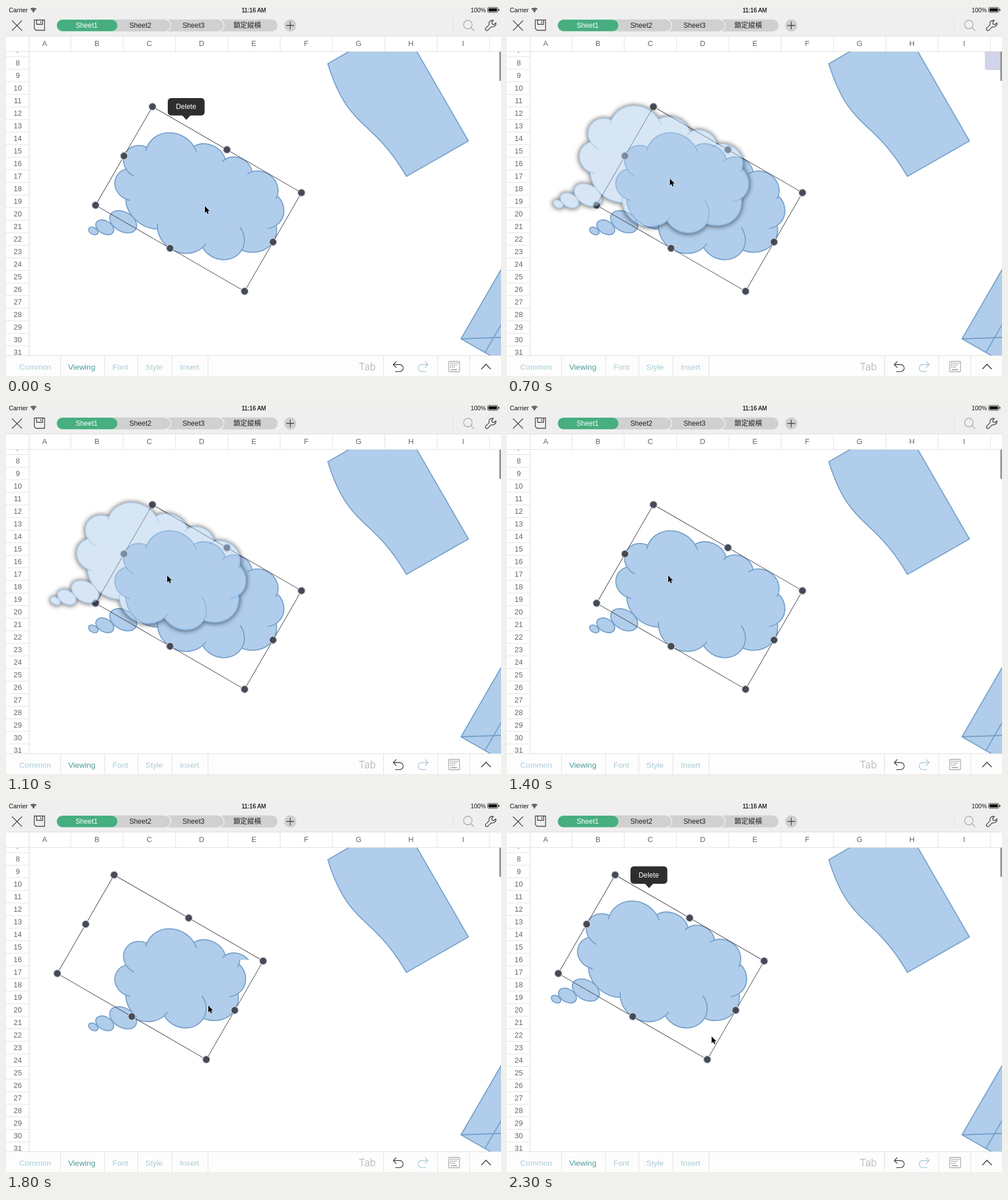
Write an HTML page that moves like this. It is 866 by 647 pixels and loops after 2400 ms.

```html
<!DOCTYPE html>
<html lang="en">
<head>
<meta charset="utf-8">
<title>Moving a shape on a sheet</title>
<style>
html, body { margin: 0; width: 100%; height: 100%; overflow: hidden; background: #fff; }
svg { display: block; width: 100vw; height: 100vh; }
text { font-family: "Liberation Sans", "Noto Sans CJK TC", "Noto Sans CJK", sans-serif; }
.shape { fill: #b0cdeb; stroke: #749fc9; stroke-width: 1.8; stroke-linejoin: round; }
.line { fill: none; }
.icon { fill: none; stroke: #444; stroke-width: 1.3; }
#ghost { opacity: .5; filter: drop-shadow(0 0 4px #000) drop-shadow(0 1px 3px #0008); }
#ghost .shape { stroke: #6aa6e2; }
</style>
</head>
<body>
<svg id="stage" viewBox="0 0 866 647" xmlns="http://www.w3.org/2000/svg"></svg>
<script>
const LOOP = 2400, STEP = 100;
const BOX = { x: 256.2, y: 176, w: 301, h: 199 };
const GRAB = [348.5, 349], DROP = [-67, -48.5];

// Notches between the cloud's lumps, clockwise: x, y in thousandths of the box,
// sweep of the lump that follows, and how far a lump runs on past the notch
// (negative: the lump before it does).
const NOTCHES = [
  [90, 333, 128, 9], [324, 120, 107, -14], [520, 79, 116, 14], [691, 57, 129, 17],
  [887, 129, 98, -11], [968, 358, 119, -26], [866, 699, 121, 64], [661, 852, 129, 12],
  [382, 909, 91, -12], [134, 821, 140, 15], [49, 591, 144, 35]
];
const LUMP_RATIO = 1.11;

const range = (n, f) => Array.from({ length: n }, (_, i) => f(i)).join('');
const text = (x, y, s, size, fill, more = '') =>
  `<text x="${x}" y="${y}" font-size="${size}" fill="${fill}" ${more}>${s}</text>`;
const mid = 'text-anchor="middle"';
const rect = (x, y, w, h, fill, rx = 0, more = '') =>
  `<rect x="${x}" y="${y}" width="${w}" height="${h}" rx="${rx}" fill="${fill}" ${more}/>`;
const path = (d, cls, more = '') => `<path d="${d}" class="${cls}" ${more}/>`;
const rad = deg => deg * Math.PI / 180;
const at = ([x, y]) => `${(x * LUMP_RATIO).toFixed(2)} ${y.toFixed(2)}`;

// Lumps are circles here; at() widens them into ellipses.
function lump(i) {
  const point = k => {
    const [x, y] = NOTCHES[k % NOTCHES.length];
    return [x / 1000 * BOX.w / LUMP_RATIO, y / 1000 * BOX.h];
  };
  const [a, b] = [point(i), point(i + 1)];
  const half = rad(NOTCHES[i][2] / 2);
  const [dx, dy] = [(b[0] - a[0]) / 2, (b[1] - a[1]) / 2];
  const cx = a[0] + dx - dy / Math.tan(half), cy = a[1] + dy + dx / Math.tan(half);
  const r = Math.hypot(dx, dy) / Math.sin(half);
  const arc = to => `A${r * LUMP_RATIO} ${r} 0 0 1 ${at(to)}`;
  const turn = ([x, y], deg) => {
    const c = Math.cos(rad(deg)), s = Math.sin(rad(deg));
    return [cx + (x - cx) * c - (y - cy) * s, cy + (x - cx) * s + (y - cy) * c];
  };
  const before = Math.max(0, NOTCHES[i][3]);
  const after = Math.max(0, -NOTCHES[(i + 1) % NOTCHES.length][3]);
  return {
    start: a, edge: arc(b),
    folds: `M${at(turn(a, -before))}${arc(a)}M${at(b)}${arc(turn(b, after))}`
  };
}

function cloud() {
  const lumps = NOTCHES.map((_, i) => lump(i));
  const outline = `M${at(lumps[0].start)}` + lumps.map(l => l.edge).join('') + 'Z';
  const bubble = (x, y, r) =>
    `<ellipse class="shape" rx="${r}" ry="${r / 1.5}" transform="translate(${x} ${y}) rotate(30)"/>`;
  return `<g transform="translate(${BOX.x} ${BOX.y}) rotate(30)">` +
    path(outline, 'shape') + path(lumps.map(l => l.folds).join(''), 'shape line') + '</g>' +
    bubble(205, 377.3, 25.5) + bubble(172.8, 387, 17) + bubble(152.8, 393.3, 9);
}

function frame() {
  const { w, h } = BOX;
  const handle = (x, y) => `<circle cx="${x}" cy="${y}" r="6.5" fill="#464a56" stroke="#cfd2da" stroke-width="1.4"/>`;
  const handles = range(3, c => range(3, r => c === 1 && r === 1 ? '' : handle(c * w / 2, r * h / 2)));
  return `<g transform="translate(${BOX.x} ${BOX.y}) rotate(30)">` +
    rect(0, 0, w, h, 'none', 0, 'stroke="#484a50"') + handles + '</g>';
}

function sheet() {
  return range(9, c => range(24, r => rect(113 + c * 91.55, 88 + r * 22, 1, 1, '#ececec'))) +
    path('M563 101L689 28L809 236L700.5 298C640.6 194.6 599.4 218.4 563 101Z', 'shape') +
    path('M880 437L796 582L880 630Z', 'shape') +
    path('M796 582L866 579.5M838 606L872 547', 'shape line');
}

function headers() {
  const rows = range(25, i => text(20.5, 81.5 + i * 22, i + 7, 13, '#666', mid) +
    rect(0, 88 + i * 22, 40, 1, '#e4e4e4'));
  const cols = range(9, i => text(67.5 + i * 91.55, 70, 'ABCDEFGHI'[i], 13, '#666', mid) +
    rect(113 + i * 91.55, 53, 1, 26, '#e2e2e2'));
  return rect(0, 79, 40, 532, '#fff') + `<g clip-path="url(#body)">${rows}</g>` +
    rect(40, 53, 1, 558, '#dedede') + rect(0, 52, 866, 27, '#fff') + cols +
    rect(40, 53, 1, 27, '#dedede') + rect(0, 79, 866, 1, '#e2e2e2');
}

function statusBar() {
  const wave = r => path(`M${48 - r} ${10.6 - r}Q48 ${10.6 - r * 1.65} ${48 + r} ${10.6 - r}`, 'line', 'stroke="#111" stroke-width="1.5"');
  return text(5, 11, 'Carrier', 10.8, '#111') + wave(5) + wave(3) + '<circle cx="48" cy="9.8" r="1.3" fill="#111"/>' +
    text(433.5, 11, '11:16 AM', 10.3, '#111', mid + ' stroke="#111" stroke-width=".25"') +
    text(813, 11, '100%', 10.3, '#111') +
    rect(842.5, 2.5, 18, 8.5, 'none', 2, 'stroke="#111" stroke-width=".8"') +
    rect(844, 4, 15, 5.5, '#111', 1) + rect(861.6, 5, 1.5, 3.5, '#111', .7);
}

function topBar() {
  const tabEnd = x => path(`M${x - 11} 23.5A10.5 10.5 0 0 1 ${x - 11} 44.5`, 'line', 'stroke="#f2f2f2" stroke-width="1.3"');
  const tab = (x, s, fill = '#222') => text(x, 38.3, s, 12.2, fill, mid);
  return rect(0, 0, 866, 52, '#efefef') + rect(0, 52, 866, 1, '#dcdcdc') + statusBar() +
    path('M10.5 25.5L28 43M28 25.5L10.5 43', 'icon') +
    path('M49.5 24.5H67.5V42.5H52.5L49.5 39.5ZM53.5 24.5V32H64V24.5M60.7 26.5V30', 'icon') +
    rect(88.5, 23.5, 386.5, 21, '#d0d0d0', 10.5) + tabEnd(289) + tabEnd(382) +
    rect(88.5, 23.5, 107, 21, '#47ae80', 10.5, 'stroke="#e6f1ec" stroke-width=".8"') +
    tab(141, 'Sheet1', '#fff') + tab(235, 'Sheet2') + tab(328, 'Sheet3') + tab(422, '鎖定縱橫') +
    '<circle cx="497.3" cy="34" r="10.7" fill="#d0d0d0"/>' + path('M490.5 34H504M497.3 27.2V40.8', 'icon') +
    rect(782, 22, 1, 25, '#e2e2e2') +
    path('M815.5 32.5A7.5 7.5 0 1 1 800.5 32.5A7.5 7.5 0 1 1 815.5 32.5M813.5 38L819 43.5', 'icon', 'style="stroke:#aaa"') +
    path('M857 29.5l-3.3 3-3.2-.8-.8-3.2 3-3.2c-5-1.4-9 3-7.4 7.3l-5.7 5.8c-2.5 2.8 1 6.2 3.7 3.7l5.8-5.8c4.6 1.5 9-2.4 7.9-6.8z', 'icon');
}

function bottomBar() {
  const pale = '#a9cbd6';
  const back = 'M683 621.5L677.5 627L683 632.5M677.5 627H688.7A6.2 6.2 0 0 1 688.7 639.4H681';
  const keys = range(3, r => range(5 - r, c => rect(777 + c * 3.1, 624 + r * 3.4, 2, 1.5, '#999')));
  const label = (x, s, fill = pale) => text(x, 635.5, s, 13.7, fill, mid);
  return rect(0, 611, 866, 36, '#fdfdfd') + rect(0, 611, 866, 1, '#e0e0e0') +
    [95, 172, 230, 290, 353, 660, 755, 811].map(x => rect(x, 612, 1, 35, '#e0e0e0')).join('') +
    label(51, 'Common') + label(132.5, 'Viewing', '#4d9a98') + label(200, 'Font') +
    label(259, 'Style') + label(321, 'Insert') +
    text(632, 637, 'Tab', 18, '#a9a9a9', mid + ' style="font-family:Roboto,sans-serif;font-weight:300"') +
    path(back, 'icon') + path(back, 'icon', `transform="translate(1416 0) scale(-1 1)" style="stroke:${pale}"`) +
    rect(774.5, 621.5, 19, 18, 'none', 1, 'stroke="#aaa" stroke-width="1.3"') + keys + rect(778, 635, 11, 1.5, '#999') +
    path('M831.5 635L839.7 626.5L848 635', 'icon', 'style="stroke-width:1.6"');
}

const stage = document.getElementById('stage');
stage.innerHTML = `<defs>
  <g id="cloud">${cloud()}</g>
  <clipPath id="body"><rect y="79.5" width="866" height="531.5"/></clipPath>
  <clipPath id="stale"><path d="M0 80H425V276H231V611H0Z"/></clipPath>
  <clipPath id="fresh"><path d="M229 276H866V611H229Z"/></clipPath>
  </defs>` + rect(0, 0, 866, 647, '#fff') + `
  <g clip-path="url(#body)">${sheet()}
    <use id="whole" href="#cloud"/>
    <g id="partial"><g clip-path="url(#stale)"><use href="#cloud"/></g>
      <g clip-path="url(#fresh)"><use href="#cloud" x="${DROP[0]}" y="${DROP[1]}"/></g></g>
    <g id="frame">${frame()}</g>
    <g id="ghost">${cloud()}</g>
    <path id="edge" d="M866 80H836V108Q836 112 840 112H866Z" fill="#b5b8da" opacity=".62"/>
  </g>` + rect(863, 79, 4, 52, '#969696', 1.5) + headers() + topBar() + bottomBar() + `
  <g id="callout">${rect(283, 161, 64.5, 30.5, '#2e2e2f', 6)}
    <path d="M308 191L315.5 199L323 191Z" fill="#2e2e2f"/>${text(315, 180, 'Delete', 12.3, '#fff', mid)}</g>
  <path id="pointer" d="M0 0V11.7L2.7 9.2L4.5 13.4L6.5 12.5L4.7 8.4H8.4Z" fill="#000" stroke="#fff" stroke-width="1" paint-order="stroke"/>`;

const part = Object.fromEntries(['whole', 'partial', 'frame', 'ghost', 'edge', 'callout', 'pointer']
  .map(id => [id, document.getElementById(id)]));
const show = (el, on) => el.setAttribute('display', on ? 'inline' : 'none');
const move = (el, x, y) => el.setAttribute('transform', `translate(${x} ${y})`);

const ease = (step, from, to) => {
  const k = Math.min(1, Math.max(0, (step - from) / (to - from)));
  return k * k * (3 - 2 * k);
};

// Drag up and left, return, then drift down.
function pointerAt(step) {
  const drag = ease(step, 3, 7.6), back = ease(step, 14, 18), drift = ease(step, 18, 23);
  return [348 - 66 * drag + 72 * back + 4 * drift, 350 - 50 * drag + 56 * back + 54 * drift].map(Math.round);
}

function draw(time) {
  const step = Math.floor(time % LOOP / STEP);
  const [x, y] = pointerAt(step);
  const moved = step >= 15 ? DROP : [0, 0];
  const redrawing = step >= 15 && step < 20;
  move(part.pointer, x, y);
  move(part.ghost, x - GRAB[0], y - GRAB[1]);
  [part.whole, part.frame, part.callout].forEach(el => move(el, ...moved));
  show(part.whole, !redrawing);
  show(part.partial, redrawing);
  show(part.ghost, step >= 6 && step < 14);
  show(part.edge, step >= 6 && step < 9);
  show(part.callout, step < 4 || step >= 22);
}

const start = performance.now();
function tick() {
  draw(performance.now() - start);
  requestAnimationFrame(tick);
}
tick();
</script>
</body>
</html>
```
